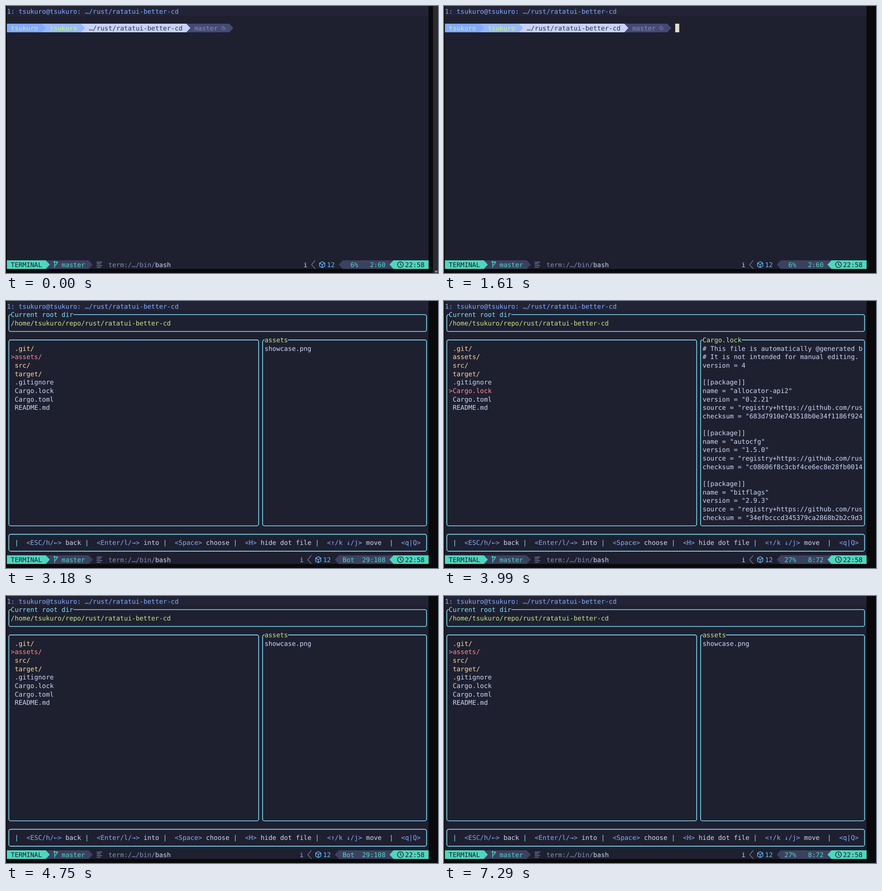
An HTML page that plays this animation: 951x589 px, repeating every 8 s.

```html
<!DOCTYPE html>
<html lang="en">
<head>
<meta charset="utf-8">
<title>Terminal directory browser</title>
<style>
html, body { margin: 0; width: 100%; height: 100%; overflow: hidden; background: #0a0a0c; }
svg { display: block; width: 951px; height: 589px; }
text {
  font: 14.27px "DejaVu Sans Mono", "Noto Sans Mono", monospace;
  text-rendering: geometricPrecision;
  font-variant-ligatures: none;
}
</style>
</head>
<body>
<svg id="stage" viewBox="0 0 951 589"></svg>
<script>
const CW = 8.593, RH = 18.64, LOOP = 8000;
const C = {
  bg: '#1e2030', tab: '#222436', edge: '#0a0a0c', fg: '#cdd6f5', dim: '#828bb8',
  blue: '#82aaff', cyan: '#86e1fc', teal: '#4fd6be', slate: '#3b4261', lime: '#c3e88d',
  dir: '#ffd7a0', hot: '#ff8a93', ink: '#1b1d2b', sky: '#65bcff'
};
const USER = 'tsukuro', PROJECT = 'ratatui-better-cd';

const colX = c => 2 + c * CW;
const rowTop = r => Math.round(2 + r * RH);
const rowMid = r => 2 + (r + .5) * RH;
const escapeText = s => s.replace(/&/g, '&amp;').replace(/</g, '&lt;');

// Every word is placed on its own grid column.
const text = (c, r, s, color) => [...s.matchAll(/\S+/g)].map(m =>
  `<text x="${colX(c + m.index).toFixed(2)}" y="${(rowMid(r) + 5.2).toFixed(2)}" fill="${color}">${escapeText(m[0])}</text>`).join('');
const rect = (x, y, w, h, color) => `<rect x="${x}" y="${y}" width="${w}" height="${h}" fill="${color}"/>`;
const band = (c0, c1, r, color) =>
  rect(colX(c0), rowTop(r), colX(c1) - colX(c0) + .3, rowTop(r + 1) - rowTop(r), color);
const arrow = (c, r, color, back, left) => {
  const [a, b] = left ? [colX(c + 1) + .3, colX(c)] : [colX(c) - .3, colX(c + 1)];
  return band(c, c + 1, r, back) +
    `<path d="M${a} ${rowTop(r)}L${b} ${rowMid(r)}L${a} ${rowTop(r + 1)}Z" fill="${color}"/>`;
};
const icon = (c, r, d, color, w = 1.4) => `<path transform="translate(${colX(c)} ${rowMid(r)})" d="${d}"
  fill="none" stroke="${color}" stroke-width="${w}" stroke-linejoin="round"/>`;
const panel = (c0, c1, r0, r1) => `<rect x="${colX(c0 + .5)}" y="${rowMid(r0)}" width="${(c1 - c0) * CW}"
  height="${(r1 - r0) * RH}" rx="4" fill="none" stroke="${C.cyan}" stroke-width="1.6"/>`;
const heading = (c, r, s, color) => band(c, c + s.length, r, C.bg) + text(c, r, s, color);

const crate = (name, version, sum) => ['', '[[package]]', `name = "${name}"`, `version = "${version}"`,
  'source = "registry+https://github.com/rus', `checksum = "${sum}`];
const shortcut = (keys, what) => `| ${keys.padEnd(18)}| ${what}`;

// name, number of leading folders in the preview, preview lines
const ENTRIES = [
  ['.git/', 5, ['hooks', 'info', 'logs', 'objects', 'refs', 'COMMIT_EDITMSG', 'HEAD', 'ORIG_HEAD',
    'config', 'description', 'index']],
  ['assets/', 0, ['showcase.png']],
  ['src/', 0, ['app.rs', 'key_handle.rs', 'main.rs', 'ui.rs']],
  ['target/', 2, ['debug', 'release', '.rustc_info.json', 'CACHEDIR.TAG']],
  ['.gitignore', 0, ['/target']],
  ['Cargo.lock', 0, [
    '# This file is automatically @generated b', '# It is not intended for manual editing.', 'version = 4',
    ...crate('allocator-api2', '0.2.21', '683d7910e743518b0e34f1186f924'),
    ...crate('autocfg', '1.5.0', 'c08606f8c3cbf4ce6ec8e28fb0014'),
    ...crate('bitflags', '2.9.3', '34efbcccd345379ca2868b2b2c9d3')]],
  ['Cargo.toml', 0, ['[package]', `name = "${PROJECT}"`, 'version = "0.1.0"', 'edition = "2024"', '',
    '[dependencies]', 'crossterm = "0.29.0"', 'ratatui = "0.29.0"']],
  ['README.md', 0, [
    '# rd-better-cd: Modern TUI Directory Chan', 'rd-better-cd is a terminal tool that repl', '', '',
    '## Features',
    '- **Intuitive TUI**: Clean and modern int', '- **Keyboard Controls**: Supports both st',
    '- **Hidden Files Toggle**: Easily show/hi', '- **Bash Integration**: Automatically upd', '', '',
    '## Keyboard Shortcuts', shortcut('Keys', 'Function'), '|' + '-'.repeat(19) + '|' + '-'.repeat(20),
    shortcut('`ESC` / `←` / `h`', 'Go back to the pare'), shortcut('`Enter` / `→` / `l` ', 'Enter the selecte'),
    shortcut('`↑` / `k`', 'Move highlight up.'), shortcut('`↓` / `j`', 'Move highlight down'),
    shortcut('`H` (uppercase)', 'Toggle visibility o'), shortcut('`Space`', 'Confirm and switch'),
    shortcut('`q` / `Q`', 'Quit the TUI (Bash')]]
];

// column of the bar, column of the keys, keys, column of the label, label
const HELP = [
  [2, 5, '<ESC/h/←>', 15, 'back'], [20, 23, '<Enter/l/→>', 35, 'into'], [40, 43, '<Space>', 51, 'choose'],
  [58, 61, '<H>', 65, 'hide dot file'], [79, 82, '<↑/k ↓/j>', 92, 'move'], [98, 101, '<q|Q>', 107, '']
];

function drawPrompt({ typed, cursor }) {
  const a = '#82aaff', b = '#9ab8ff', c = '#c8d3f5', d = '#444a73', end = 59 + typed.length;
  return band(0, 9, 2, a) + text(1, 2, USER, '#c9ee8c') + arrow(9, 2, a, b) +
    band(10, 19, 2, b) + text(11, 2, USER, '#c8fb62') + arrow(19, 2, b, c) +
    band(20, 46, 2, c) + text(21, 2, '…/rust/' + PROJECT, '#2f334d') + arrow(46, 2, c, d) +
    band(47, 57, 2, d) + text(48, 2, 'master', C.dim) +
    icon(55, 2, 'M8.2 0A4 4 0 1 1 4.2 -4V0Z', C.dim, 1) + arrow(57, 2, d, C.bg) +
    text(59, 2, typed, C.fg) + (cursor ? band(end, end + 1, 2, '#e2dccf') : '');
}

function drawBrowser({ sel }) {
  const [name, folders, lines] = ENTRIES[sel];
  return panel(0, 107, 1, 3) + heading(1, 1, 'Current root dir', C.cyan) +
    text(1, 2, `/home/${USER}/repo/rust/${PROJECT}`, C.lime) +
    panel(0, 64, 4, 26) + panel(65, 107, 4, 26) + panel(0, 107, 27, 29) +
    heading(66, 4, name.replace('/', ''), C.lime) +
    ENTRIES.map(([n], i) => i === sel ? text(1, 5 + i, '>' + n, C.hot)
      : text(2, 5 + i, n, n.endsWith('/') ? C.dir : C.fg)).join('') +
    lines.map((l, i) => text(66, 5 + i, l, i < folders ? C.dir : C.fg)).join('') +
    HELP.map(([bar, k, keys, w, label]) =>
      text(bar, 28, '|', C.cyan) + text(k, 28, keys, C.blue) + text(w, 28, label, C.fg)).join('');
}

function drawStatus({ mode, pos }) {
  const r = 30, n = mode.length, p = 97 - pos.length;
  const hue = mode === 'NORMAL' ? C.blue : C.teal;
  return band(0, n + 2, r, hue) + text(1, r, mode, C.ink) + arrow(n + 2, r, hue, C.slate) +
    band(n + 3, n + 13, r, C.slate) +
    icon(n + 4, r, 'M2 -8V7M0 -5L2 -8L4 -5M2 3C2 0 7 1 7 -3V-5M5 -4L7 -7L9 -4', hue) +
    text(n + 6, r, 'master', hue) + arrow(n + 13, r, C.slate, C.bg) +
    icon(n + 15, r, 'M0 -5.5H12M0 -1.7H9M0 2.1H12M0 5.9H9', C.dim) +
    text(n + 18, r, 'term:/…/bin/', C.dim) + text(n + 30, r, 'bash', C.fg) +
    text(p - 11, r, 'i', pos.startsWith('Bot') ? '#c099ff' : C.fg) +
    icon(p - 9, r, 'M8.6 -9.3L0.5 0L8.6 9.3', C.dim, 1.2) +
    icon(p - 7, r, 'M6.6 -6.6L12.4 -3.4V3.4L6.6 6.6L0.8 3.4V-3.4ZM0.8 -3.4L6.6 0L12.4 -3.4M6.6 0V6.6', C.sky) +
    text(p - 5, r, '12', C.sky) +
    arrow(p - 2, r, C.slate, C.bg, true) + band(p - 1, 98, r, C.slate) + text(p, r, pos, hue) +
    arrow(98, r, hue, C.slate, true) + band(99, 108, r, hue) +
    icon(100, r, 'M0.7 0A6.4 6.4 0 1 1 13.5 0A6.4 6.4 0 1 1 0.7 0M7.1 -4V0.3L10 2', C.ink) +
    text(102, r, '22:58', C.ink);
}

const drawStrip = () => rect(940, 0, 11, 589, '#2b2b2d') + '<path d="M943 584h8l-4 5z" fill="#8d93b5"/>';

function draw(s) {
  return rect(0, 0, 951, 589, C.edge) + rect(2, 0, 928, 580, C.bg) + rect(2, 0, 928, 21, C.tab) +
    text(0, 0, `1: ${USER}@${USER}: …/rust/${PROJECT}`, C.blue) +
    (s.sel < 0 ? drawPrompt(s) : drawBrowser(s)) + drawStatus(s) + (s.strip ? drawStrip() : '');
}

const BOTTOM = 'Bot  29:108', UPPER = '27%   8:72', HALF = '51%  15:72';
const STEPS = [
  [0, { strip: true, mode: 'TERMINAL', cursor: false, typed: '', sel: -1, pos: ' 6%   2:60' }],
  [50, { strip: false }],
  [650, { mode: 'NORMAL', cursor: true }],
  [1610, { mode: 'TERMINAL' }],
  [2020, { typed: 'r' }],
  [2230, { typed: 'rd' }],
  [2430, { sel: 0 }],
  [2730, { pos: BOTTOM }],
  [3180, { sel: 1 }],
  [3390, { sel: 2 }],
  [3540, { sel: 3 }],
  [3740, { sel: 4, pos: UPPER }],
  [3990, { sel: 5 }],
  [4190, { sel: 6 }],
  [4350, { sel: 7 }],
  [4550, { sel: 0 }],
  [4700, { sel: 1 }],
  [4750, { pos: BOTTOM }],
  [4960, { sel: 2 }],
  [5420, { sel: 1 }],
  [5670, { sel: 0, pos: HALF }],
  [6180, { sel: 1 }],
  [6330, { sel: 2 }],
  [6690, { pos: UPPER }],
  [7290, { sel: 1 }]
];

const stage = document.getElementById('stage');
const startTime = performance.now();
let shown = 0;

function tick() {
  const t = (performance.now() - startTime) % LOOP;
  const count = STEPS.filter(([at]) => at <= t).length;
  if (count !== shown) {
    shown = count;
    stage.innerHTML = draw(Object.assign({}, ...STEPS.slice(0, count).map(([, change]) => change)));
  }
  requestAnimationFrame(tick);
}
tick();
</script>
</body>
</html>
```
